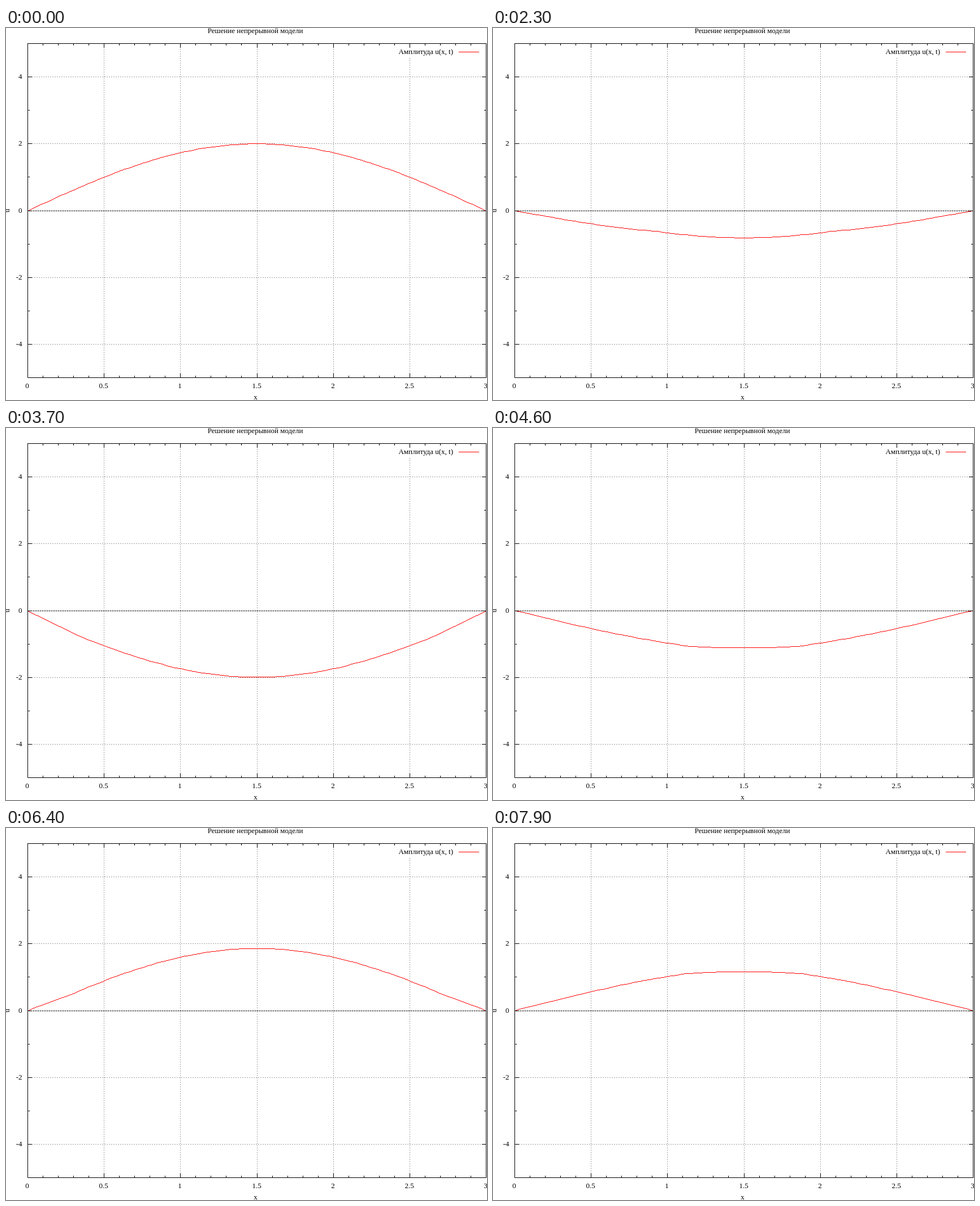
Animation, 851 px wide and 658 px high, one loop 8 s. Source, as an HTML page with a canvas:

```html
<!DOCTYPE html>
<html lang="ru">
<head>
<meta charset="utf-8">
<title>Решение непрерывной модели</title>
<style>
  html, body { margin: 0; width: 851px; height: 658px; overflow: hidden; background: #fff; }
  canvas { display: block; }
</style>
</head>
<body>
<canvas id="stage" width="851" height="658"></canvas>
<script>
const ctx = document.getElementById('stage').getContext('2d');
const LEFT = 38, RIGHT = 849, TOP = 27, BOTTOM = 618;
const LEN = 3, STEPS = 99;
const SPEED = 0.9;          // wave speed, units per second
const KICK = 0.3;           // uniform initial velocity
const HALF = LEN / SPEED;   // half a period of the string
const LOOP = 8000, TICK = 100;

const px = x => Math.round(LEFT + x / LEN * (RIGHT - LEFT));
const py = u => Math.round(BOTTOM - (u + 5) / 10 * (BOTTOM - TOP));

function hline(x0, x1, y) { ctx.fillRect(x0, y, x1 - x0 + 1, 1); }
function vline(x, y0, y1) { ctx.fillRect(x, y0, 1, y1 - y0 + 1); }

function dotsH(y, from = LEFT) {
  for (let x = from; x < RIGHT; x += 4) hline(x, x + 1, y);
}
function dotsV(x, from) {
  for (let y = BOTTOM; y > from; y -= 4) vline(x, y - 1, y);
}

function label(text, x, y, align) {
  ctx.textAlign = align;
  ctx.fillText(text, x, y);
}

// String released from a sine arc with a uniform upward kick
function wave(x, t) {
  const sign = Math.floor(t / HALF) % 2 ? -1 : 1;
  const s = t % HALF;
  const arc = 2 * Math.sin(Math.PI * x / LEN) * Math.cos(Math.PI * s / HALF);
  const lift = KICK * Math.min(s, HALF - s, x / SPEED, (LEN - x) / SPEED);
  return sign * (arc + lift);
}

function drawGrid() {
  ctx.fillStyle = '#a0a0a0';
  for (let u = -4; u <= 4; u += 2) dotsH(py(u));
  for (let x = 0.5; x < LEN; x += 0.5) dotsV(px(x), x === 2.5 ? 50 : TOP);
  ctx.fillStyle = '#000';
  dotsH(py(0), LEFT + 2);
}

function drawFrame() {
  ctx.fillStyle = '#000';
  hline(LEFT, RIGHT, TOP);
  hline(LEFT, RIGHT, BOTTOM);
  vline(LEFT, TOP, BOTTOM);
  vline(RIGHT, TOP, BOTTOM);
  for (let i = 0; i <= 30; i++) {
    const x = px(i / 10), n = i % 5 ? 3 : 7;
    vline(x, TOP, TOP + n);
    vline(x, BOTTOM - n, BOTTOM);
  }
  for (let u = -4; u <= 4; u++) {
    const y = py(u), n = u % 2 ? 3 : 7;
    hline(LEFT, LEFT + n, y);
    hline(RIGHT - n, RIGHT, y);
  }
}

function drawText() {
  ctx.font = '13px "Liberation Serif", "Times New Roman", serif';
  ctx.fillStyle = '#000';
  label('Решение непрерывной модели', 441, 9, 'center');
  label('Амплитуда u(x, t)', 791, 46, 'right');
  for (let u = -4; u <= 4; u += 2) label(String(u), 28.5, py(u) + 4, 'right');
  for (let x = 0; x <= LEN; x += 0.5) label(String(x), px(x) - 0.5, 637, 'center');
  label('x', 441.5, 657, 'center');
  ctx.save();
  ctx.translate(6, 323);
  ctx.rotate(-Math.PI / 2);
  label('u', 0, 0, 'center');
  ctx.restore();
}

function drawCurve(t) {
  ctx.fillStyle = '#f00';
  hline(801, 836, 42);
  for (let i = 0; i < STEPS; i++) {
    const a = i * LEN / STEPS, b = (i + 1) * LEN / STEPS;
    const x0 = px(a), x1 = px(b), y0 = py(wave(a, t)), y1 = py(wave(b, t));
    for (let x = x0; x <= x1; x++) {
      hline(x, x, Math.round(y0 + (y1 - y0) * (x - x0) / (x1 - x0)));
    }
  }
}

function draw(ms) {
  const t = Math.floor(ms % LOOP / TICK) * TICK / 1000;
  ctx.fillStyle = '#fff';
  ctx.fillRect(0, 0, 851, 658);
  drawGrid();
  drawCurve(t);
  drawFrame();
  drawText();
}

let start;
function loop(now) {
  if (start === undefined) start = now;
  draw(Math.max(0, now - start));
  requestAnimationFrame(loop);
}
draw(0);
requestAnimationFrame(loop);
</script>
</body>
</html>
```
